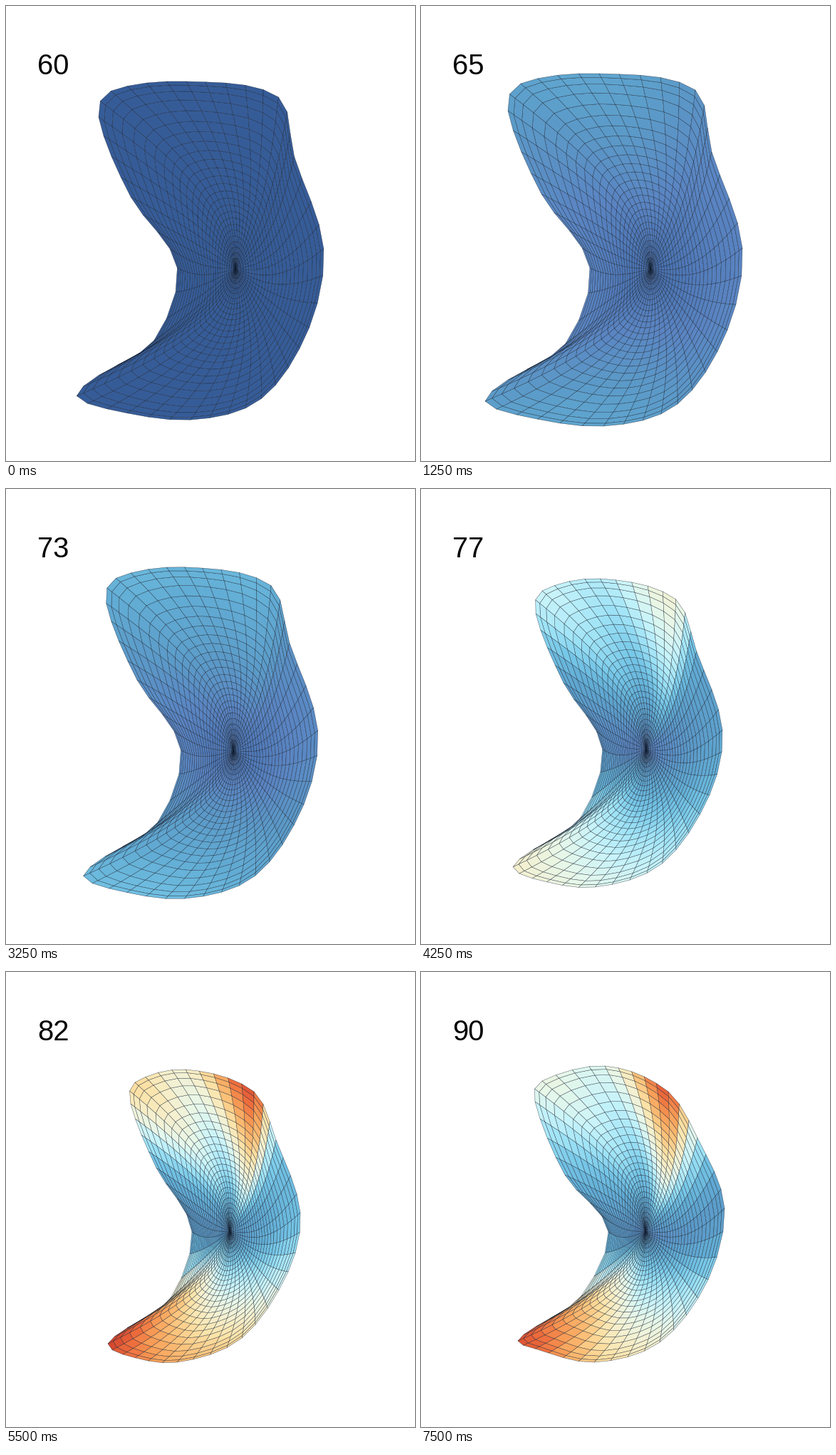
A matplotlib script for the animation above (7750 ms loop, 574 by 639 pixels).

```python
import numpy as np
import matplotlib.pyplot as plt
from matplotlib.animation import FuncAnimation
from matplotlib.collections import PolyCollection
from matplotlib.colors import LinearSegmentedColormap

W, H, DPI = 574, 639, 100
FIRST, FULL_AT, BENT_AT, LAST = 60, 65, 82, 90
STEP_MS = 250
RINGS, SPOKES = 26, 51

COLORS = ["#365c98", "#4a73b2", "#5a84c2", "#5b9ac8", "#62add5", "#77c8e8",
          "#9fe3f6", "#c6f3fa", "#e6f7ea", "#f4f0d0", "#fce3a8", "#fbc27a",
          "#f8a058", "#ee6c3c", "#d6482f"]
CMAP = LinearSegmentedColormap.from_list("strain", COLORS)

SPOKE = np.arange(SPOKES)
ANGLE = np.pi - 2 * np.pi * SPOKE / SPOKES
COS, SIN = np.cos(ANGLE), np.sin(ANGLE)

# Spokes that carry a key point of the rim, clockwise from the left waist.
KEYS = np.array([0, 4, 8, 10, 14, 19, 22, 26, 29, 33, 37, 41, 43, 45, 48])
WAIST, TOP, SIDE, BOTTOM = 0, 14, 26, 37


def closed_curve(points):
    """Smooth closed curve through the key points, one sample per spoke."""
    p = np.array(points, float)
    gap = (np.roll(KEYS, -1) - KEYS) % SPOKES
    after = np.roll(p, -1, axis=0)
    slope = (after - np.roll(p, 1, axis=0)) / (gap + np.roll(gap, 1))[:, None]
    k = np.searchsorted(KEYS, SPOKE, side="right") - 1
    h = gap[k][:, None]
    u = (SPOKE - KEYS[k])[:, None] / h
    ease = u * u * (3 - 2 * u)
    curve = (p[k] * (1 - ease) + after[k] * ease
             + h * u * (1 - u) ** 2 * slope[k]
             - h * u * u * (1 - u) * np.roll(slope, -1, axis=0)[k])
    return curve.T


# Each pose: rim x, rim y, rim level in percent; then the same at the center.
full_xy = closed_curve([
    (237, 368), (169, 264), (122, 147), (140, 109), (250, 95),
    (385, 118), (408, 205), (451, 340), (430, 455), (360, 559),
    (256, 590), (134, 574), (90, 555), (122, 525), (203, 474)])
FULL = np.vstack([full_xy, 14 + 12 * SIN ** 2])
BENT = closed_curve([
    (261, 365, 24), (211, 275, 32), (175, 185, 66), (181, 155, 74),
    (252, 137, 64), (348, 168, 98), (379, 236, 42), (413, 338, 34),
    (396, 421, 50), (331, 514, 72), (240, 548, 82), (164, 537, 94),
    (143, 522, 102), (170, 500, 96), (231, 458, 72)])
TWISTED = closed_curve([
    (263, 365, 25), (202, 285, 32), (160, 182, 53), (170, 153, 60),
    (258, 132, 56), (347, 168, 97), (388, 233, 48), (426, 332, 22),
    (403, 432, 42), (335, 520, 63), (243, 548, 75), (160, 529, 95),
    (136, 518, 98), (161, 498, 95), (225, 455, 65)])


def with_center(rim, *center):
    return np.column_stack([rim, center])


FULL = with_center(FULL, 322, 369, 5)
BENT = with_center(BENT, 314, 364, 20)
TWISTED = with_center(TWISTED, 315, 364, 17)


def smooth(u):
    return (1 - np.cos(np.pi * u)) / 2


def pose_at(value):
    """Swell and light up, then bend inwards, then twist back a little."""
    if value <= FULL_AT:
        u = (value - FIRST) / (FULL_AT - FIRST)
        mid = FULL[:, -1:]
        pose = mid + (FULL - mid) * (.96 + .04 * u)
        pose[2] = FULL[2] * u
        return pose
    if value <= BENT_AT:
        e = smooth(((value - FULL_AT) / (BENT_AT - FULL_AT)) ** 1.2)
        weight = np.array([[e], [e], [e * e]])
        return FULL + (BENT - FULL) * weight
    e = smooth((value - BENT_AT) / (LAST - BENT_AT))
    return BENT + (TWISTED - BENT) * e


def ring_scale():
    """Ring radii from 0 to 1, packed closer at the rim."""
    t = np.linspace(0, 1, RINGS + 1)[:, None]
    pack = 2.9 * (.55 + .45 * SIN ** 2)
    s = t - pack * np.maximum(0, t - .86) ** 2
    return s / s[-1]


SCALE = ring_scale()
BLEND = SCALE ** 2


def core_of(arm):
    """Tall ellipse that the inner rings follow; its sides sag slightly."""
    left, right = -.95 * arm[0, WAIST], .75 * arm[0, SIDE]
    up, down = -.7 * arm[1, TOP], .8 * arm[1, BOTTOM]
    x = COS * np.where(COS < 0, left, right)
    y = -SIN * np.where(SIN > 0, up, down) + 22 * COS ** 4
    return np.array([x, y])


def mesh(value):
    pose = pose_at(value)
    rim, mid = pose[:, :-1], pose[:, -1]
    arm = rim[:2] - mid[:2, None]
    core = core_of(arm)
    xy = [mid[i] + SCALE * ((1 - BLEND) * core[i] + BLEND * arm[i])
          for i in range(2)]
    grid = np.stack(xy, axis=-1)
    side = np.roll(grid, -1, axis=1)
    quads = np.stack([grid[:-1], grid[1:], side[1:], side[:-1]], axis=2)
    level = mid[2] + (rim[2] - mid[2]) * SCALE
    level = (level + np.roll(level, -1, axis=1)) / 2
    level = (level[:-1] + level[1:]) / 200
    return quads.reshape(-1, 4, 2), CMAP(level.ravel())


fig = plt.figure(figsize=(W / DPI, H / DPI), dpi=DPI, facecolor="white")
ax = fig.add_axes([0, 0, 1, 1])
ax.set_xlim(0, W)
ax.set_ylim(H, 0)
ax.axis("off")

surface = PolyCollection([], edgecolors=(.05, .09, .15, .75), linewidths=.32)
ax.add_collection(surface)
label = ax.text(44, 96, "", family="Liberation Sans", color="black",
                fontsize=40 * 72 / DPI, va="baseline", ha="left")


def draw(i):
    value = FIRST + i
    quads, colors = mesh(value)
    surface.set_verts(quads)
    surface.set_facecolor(colors)
    label.set_text(str(value))
    return surface, label


anim = FuncAnimation(fig, draw, frames=LAST - FIRST + 1, interval=STEP_MS,
                     repeat=True, repeat_delay=0, blit=False)
plt.show()
```
